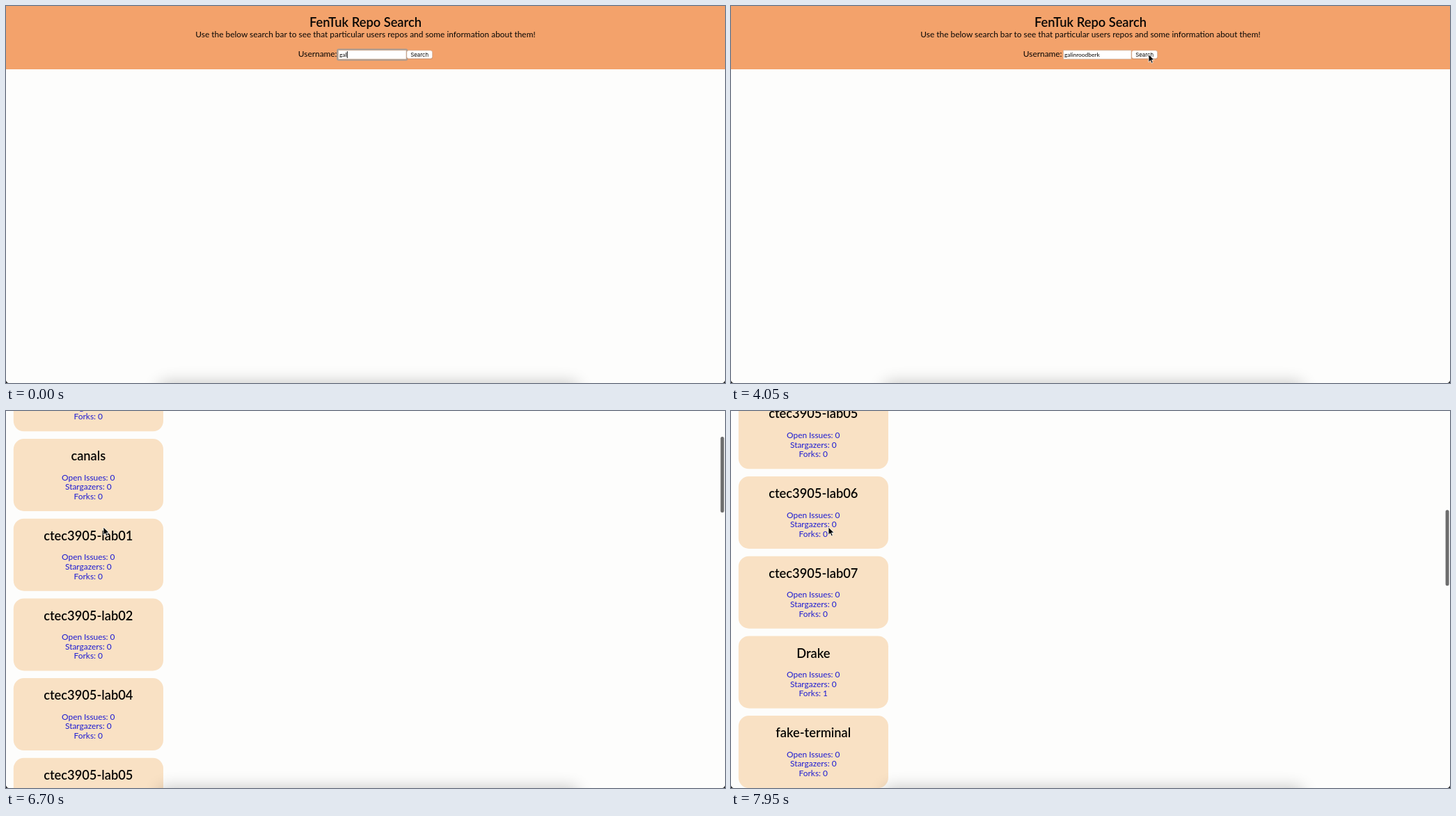
These frames come from a looping animation (1033 px wide and 542 px high, 8000 ms). An HTML page:

```html
<!DOCTYPE html>
<html lang="en">
<head>
<meta charset="utf-8">
<title>Repo Search</title>
<style>
  html, body { margin: 0; width: 100%; height: 100%; overflow: hidden; background: #fdfdfc; }
  svg { display: block; width: 100vw; height: 100vh; }
  text { font-family: Lato, "Open Sans", sans-serif; font-size: 11.9px; fill: #080604; white-space: pre; }
  .mid { text-anchor: middle; }
  .big { font-size: 18.3px; font-weight: 600; }
  .link { fill: #1d1bd2; }
  .typed { font-size: 8.4px; }
  .button { font-family: Inter, "Liberation Sans", sans-serif; font-size: 7.8px; }
</style>
</head>
<body>
<svg viewBox="0 0 1033 542" preserveAspectRatio="none">
  <defs>
    <filter id="soft" filterUnits="userSpaceOnUse" x="150" y="480" width="740" height="130">
      <feGaussianBlur stdDeviation="11"/>
    </filter>
  </defs>
  <rect width="1033" height="542" fill="#fdfdfc"/>
  <g id="page">
    <rect width="1033" height="91" fill="#f3a26b"/>
    <text class="mid big" x="516.5" y="30.3">FenTuk Repo Search</text>
    <text class="mid" x="516.5" y="45.2">Use the below search bar to see that particular users repos and some information about them!</text>
    <text x="419.8" y="72.6">Username:</text>
    <rect id="ring" x="476.2" y="62.4" width="100" height="15" rx="1.5" fill="none" stroke="#a39a94" stroke-width="2"/>
    <rect x="477.5" y="63.8" width="97.5" height="12.4" fill="#fff" stroke="#c9b3a2" stroke-width=".7"/>
    <text id="typed" class="typed" x="479" y="72.8"></text>
    <rect id="caret" y="65.2" width="1" height="9.6" fill="#000"/>
    <rect x="575.5" y="64.4" width="37.5" height="12.2" rx="3.2" fill="#b98460" opacity=".6"/>
    <rect id="button" x="575.7" y="63.8" width="37" height="12" rx="3" fill="#fff" stroke="#c08f6d" stroke-width=".5"/>
    <text class="mid button" x="594.1" y="72.6">Search</text>
    <g id="cards"></g>
  </g>
  <rect x="218" y="540" width="606" height="40" rx="14" fill="#000" opacity=".2" filter="url(#soft)"/>
  <rect id="bar" x="1026.6" width="5" height="109" rx="2.5" fill="#6d6d6d"/>
  <path d="M0 538.5V542H3.5Q.6 541.4 0 538.5M1033 538.5V542H1029.5Q1032.4 541.4 1033 538.5" fill="#111"/>
  <path id="pointer" d="M0 0V11.2L2.6 8.8L4.3 12.7L6.2 11.9L4.5 8.1H8Z" fill="#000" stroke="#fff" stroke-width=".8" stroke-linejoin="round"/>
</svg>
<script>
const LOOP = 8000, STEP = 50;
const USER = "galinroodberk";
const TYPED_AT = 2400, POINTER_AT = 2800, CLICK_AT = 3900, RESULTS_AT = 4400, SCROLL_AT = 6100;
const PITCH = 114.7;

const labs = ["01", "02", "04", "05", "06", "07"].map(n => "ctec3905-lab" + n);
const repos = ["API-Design", "canals", ...labs, "Drake", "fake-terminal"];

// [time, value...]
const scrollKeys = [[SCROLL_AT, 0], [6300, 40], [6700, 176.5], [7400, 444], [7950, 696]];
const pointerKeys = [[POINTER_AT, 560, 118], [3550, 600, 69.5], [4850, 600, 69.5],
  [5400, 148, 147.5], [5650, 148, 147.5], [5950, 140, 167]];

const $ = id => document.getElementById(id);
const show = (el, on) => el.setAttribute("visibility", on ? "visible" : "hidden");
const smooth = p => p * p * (3 - 2 * p);

function track(keys, t, ease = p => p) {
  const i = keys.findIndex(k => k[0] > t);
  if (i === 0) return keys[0].slice(1);
  if (i < 0) return keys[keys.length - 1].slice(1);
  const a = keys[i - 1], b = keys[i];
  const p = ease((t - a[0]) / (b[0] - a[0]));
  return a.slice(1).map((v, j) => v + (b[j + 1] - v) * p);
}

function card(name, i) {
  const line = (text, y, style) => `<text class="mid ${style}" x="107.5" y="${y}">${text}</text>`;
  const forks = name === "Drake" ? 1 : 0;
  return `<g transform="translate(10.8 ${101.8 + i * PITCH})">
    <rect width="215.2" height="104" rx="15" fill="#f9e1c4"/>
    ${line(name, 31.2, "big")}
    ${line("Open Issues: 0", 59.7, "link")}
    ${line("Stargazers: 0", 73.3, "link")}
    ${line("Forks: " + forks, 86.9, "link")}
  </g>`;
}

const page = $("page"), ring = $("ring"), typed = $("typed"), caret = $("caret");
const button = $("button"), cards = $("cards"), bar = $("bar"), pointer = $("pointer");
cards.innerHTML = repos.map(card).join("");

function draw(t) {
  const count = t >= TYPED_AT ? USER.length : 3 + Math.floor((t + 100) / 250);
  typed.textContent = USER.slice(0, count);
  caret.setAttribute("x", 479.3 + typed.getComputedTextLength());

  const focused = t < CLICK_AT;
  const blinkOn = t < TYPED_AT + 500 || Math.floor((t - TYPED_AT) / 500) % 2 === 0;
  show(ring, focused);
  show(caret, focused && blinkOn);
  button.setAttribute("fill", t >= CLICK_AT && t < CLICK_AT + 100 ? "#eee" : "#fff");
  show(cards, t >= RESULTS_AT);

  const [scroll] = track(scrollKeys, t);
  page.setAttribute("transform", `translate(0 ${-scroll})`);
  bar.setAttribute("y", 1.2 + scroll * 0.2025);
  show(bar, t > SCROLL_AT);

  const [x, y] = track(pointerKeys, t, smooth);
  pointer.setAttribute("transform", `translate(${x} ${y})`);
  show(pointer, t >= POINTER_AT);
}

const start = performance.now();
function tick() {
  const t = (performance.now() - start) % LOOP;
  draw(Math.floor(t / STEP) * STEP);
  requestAnimationFrame(tick);
}
tick();
</script>
</body>
</html>
```
